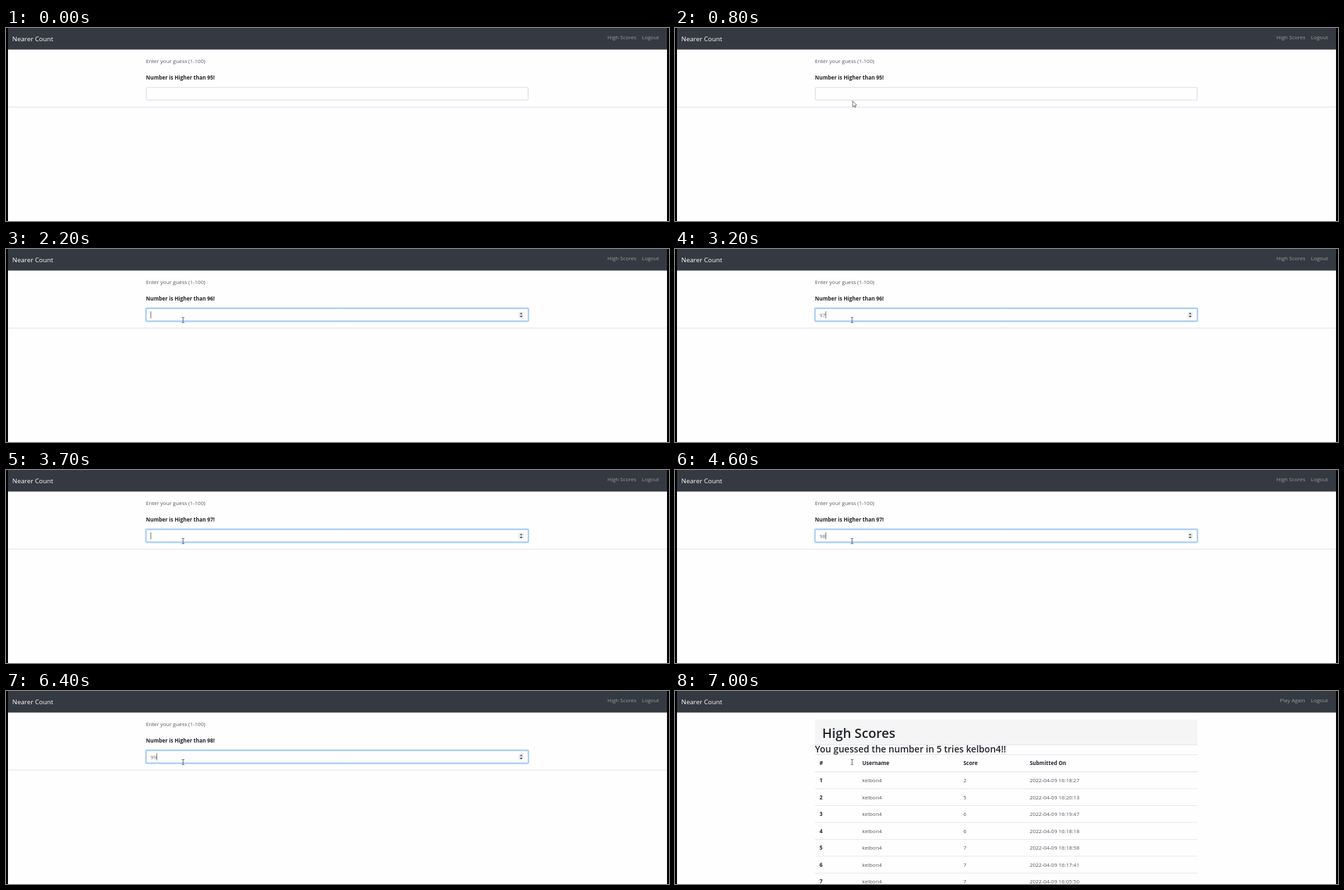
An HTML page with a canvas that plays this animation: 1000 by 292 pixels, repeating every 7200 ms.

```html
<!DOCTYPE html>
<html lang="en">
<head>
<meta charset="utf-8">
<title>Number guessing game</title>
<style>
  html, body { margin: 0; width: 100%; height: 100%; overflow: hidden; background: #000; }
  canvas { display: block; width: 1000px; height: 292px; }
</style>
</head>
<body>
<canvas id="stage" width="1000" height="292"></canvas>
<script>
const ctx = document.getElementById('stage').getContext('2d');
const LOOP = 7200, STEP = 100, SCORES_AT = 6900;
const FAMILY = '"Open Sans", "Noto Sans", sans-serif';
const BODY = 7.95, INK = '#212529', SOFT = '#50555b', RULE = '#dfe1e8';
const PLAYER = 'kelbon4';
const TARGET = { x: 267, y: 107.5 };

// Each round: when its page loads, when focus returns, the hint,
// the moments the two digits are typed, and when the caret blinks off.
const rounds = [
  { load: 0,    focus: 1000, hint: 95, keys: [1500, 1700] },
  { load: 1900, focus: 2100, hint: 96, keys: [3000, 3200], off: [2700, 3000] },
  { load: 3600, focus: 3600, hint: 97, keys: [4400, 4600], off: [4100, 4400] },
  { load: 5000, focus: 5000, hint: 98, keys: [5300, 6400], off: [5900, 6400] }
];

const scores = [
  [2, '16:18:27'], [5, '16:20:13'], [6, '16:19:47'], [6, '16:18:18'],
  [7, '16:18:58'], [7, '16:17:41'], [7, '16:05:50']
];

const clamp = v => Math.max(0, Math.min(1, v));

function text(str, x, y, color = SOFT, size = BODY, weight = 400) {
  ctx.font = `${weight} ${size}px ${FAMILY}`;
  ctx.fillStyle = color;
  ctx.fillText(str, x, y);
}

function box(x, y, w, h, color) {
  ctx.fillStyle = color;
  ctx.fillRect(x, y, w, h);
}

function shape(points, fill) {
  ctx.beginPath();
  points.forEach(([x, y]) => ctx.lineTo(x, y));
  ctx.closePath();
  ctx.fillStyle = fill;
  ctx.fill();
}

function page(link, linkX) {
  box(0, 0, 1000, 292, '#000');
  box(3, 0, 994, 33, '#353941');
  box(3, 32.6, 994, 260, '#fffeff');
  text('Nearer Count', 9.5, 20.3, '#fff', 9.8);
  text(link, linkX, 17.3, '#9a9ca0', 8);
  text('Logout', 959, 17.3, '#9a9ca0', 8);
}

function outline(inset, width, color) {
  ctx.beginPath();
  ctx.roundRect(211.5 - inset, 90 - inset, 576 + 2 * inset, 19 + 2 * inset, 1 + inset);
  ctx.lineWidth = width;
  ctx.strokeStyle = color;
  ctx.stroke();
}

function spinner() {
  box(773, 95, 8, 9.5, '#efeff0');
  shape([[774.8, 98.6], [777, 96.2], [779.2, 98.6]], '#444');
  shape([[774.8, 101], [777, 103.4], [779.2, 101]], '#444');
}

function beam({ x, y }) {
  box(x - 0.4, y - 4, 1, 8, '#555a60');
  box(x - 2, y - 4.5, 4.2, 0.9, '#777b82');
  box(x - 2, y + 3.6, 4.2, 0.9, '#777b82');
}

function arrow({ x, y }) {
  const tip = [[0, 0], [0, 9], [2, 7.2], [3.4, 10], [4.7, 9.4], [3.4, 6.7], [6.2, 6.5]];
  shape(tip.map(([dx, dy]) => [x + dx, y + dy]), '#fff');
  ctx.lineWidth = 0.7;
  ctx.strokeStyle = '#333';
  ctx.stroke();
}

function pointerAt(t) {
  const left = (1 - clamp((t - 100) / 800)) ** 2;
  return { x: TARGET.x + 60 * left, y: TARGET.y + 188 * left };
}

function drawGame(t) {
  const round = rounds.findLast(r => t >= r.load);
  const glow = clamp((t - round.focus) / (round.load ? 100 : 150));
  const mouse = pointerAt(t);
  const hover = mouse.y < 110;
  page('High Scores', 907);
  text('Enter your guess (1-100)', 211, 53);
  text(`Number is Higher than ${round.hint}!`, 211, 77.9, INK, BODY, 700);
  box(3, 119.2, 994, 1, RULE);

  outline(0, 1, '#d5d9e2');
  if (glow) {
    ctx.globalAlpha = glow;
    outline(0.7, 2.2, '#c2dcfa');
    outline(0, 1, '#8fc1f7');
    ctx.globalAlpha = 1;
  }

  const typed = round.keys.filter(k => t >= k).length;
  const value = String(round.hint + 1).slice(0, typed);
  text(value, 218, 102.8, '#666c74');
  const [offFrom, offTo] = round.off || [LOOP, LOOP];
  if (glow && !(t >= offFrom && t < offTo)) {
    box(218 + ctx.measureText(value).width, 94.3, 0.8, 10.5, '#4c5056');
  }
  if (hover || glow) spinner();
  if (t >= 200) (hover ? beam : arrow)(mouse);
}

function drawScores() {
  const columns = [218, 282.5, 435, 535];
  page('Play Again', 912.5);
  box(211, 43.5, 577, 38, '#f5f5f6');
  box(211, 81, 577, 0.8, '#dedfe2');
  text('High Scores', 222, 70.5, INK, 19.7, 600);
  text(`You guessed the number in 5 tries ${PLAYER}!!`, 211, 93.2, INK, 13.7, 600);
  box(211, 96, 577, 0.8, RULE);
  ['#', 'Username', 'Score', 'Submitted On'].forEach((label, i) =>
    text(label, columns[i], 112, INK, BODY, 700));
  box(211, 121.6, 577, 1.2, RULE);
  scores.forEach(([score, time], i) => {
    const y = 138 + i * 25.5;
    const cells = [i + 1, PLAYER, score, `2022-04-09 ${time}`];
    cells.forEach((cell, c) =>
      text(cell, columns[c], y, c ? SOFT : INK, BODY, c ? 400 : 700));
    box(211, y + 9.5, 577, 0.8, RULE);
  });
  beam(TARGET);
}

function frame(now) {
  const t = Math.floor((now % LOOP) / STEP) * STEP;
  if (t < SCORES_AT) drawGame(t);
  else drawScores();
  requestAnimationFrame(frame);
}
requestAnimationFrame(frame);
</script>
</body>
</html>
```
